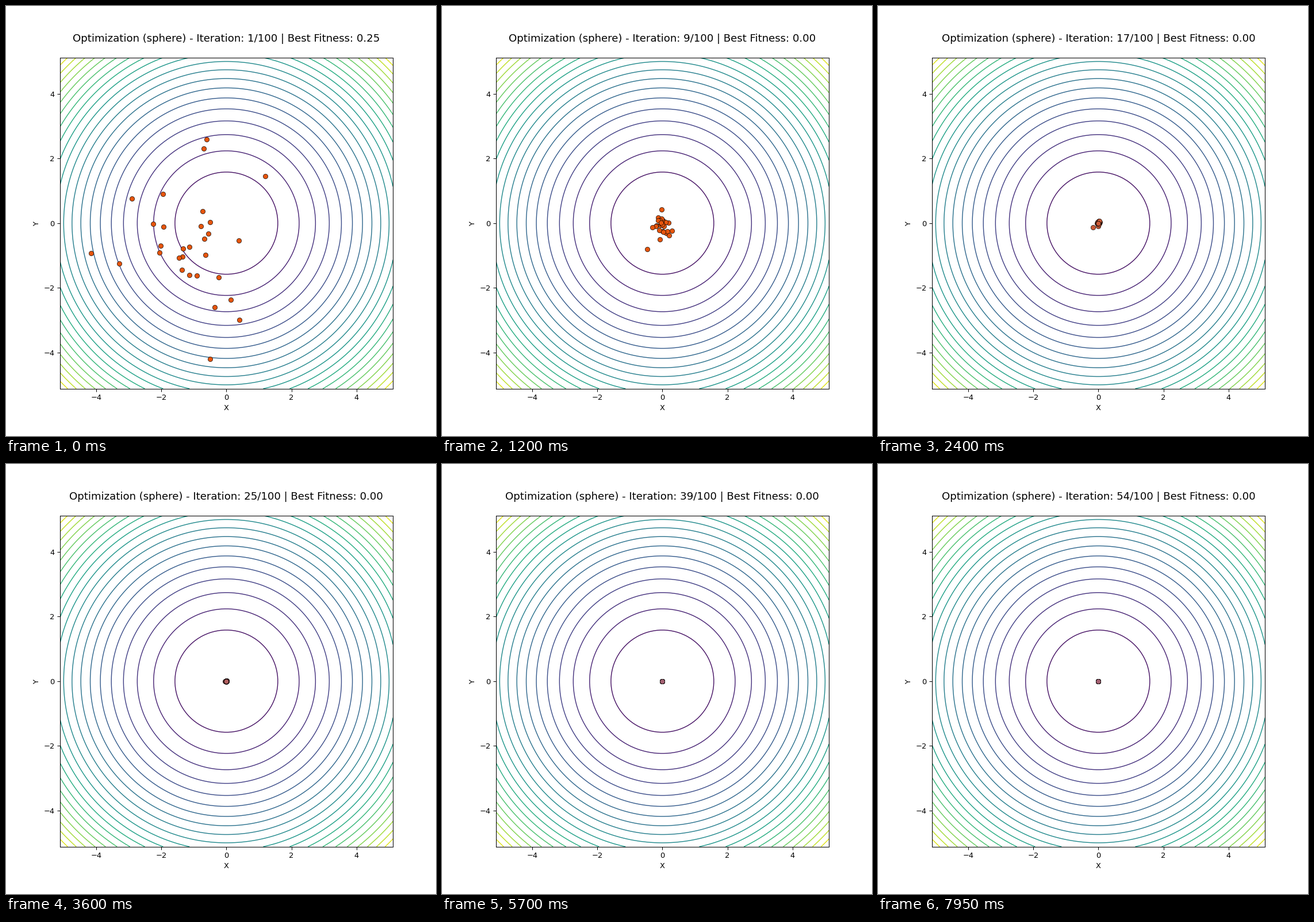
Write a matplotlib script that moves like this. It is 748 px wide and 748 px high and loops after 8 s.

```python
import numpy as np
import matplotlib.pyplot as plt
from matplotlib.animation import FuncAnimation

SIZE, INCHES = 748, 8
LIMIT = 5.12
TICK_MS, STEP_MS, LOOP_MS = 50, 150, 8000
COUNT = 30
ORANGE = np.array([230, 85, 13]) / 255
MAUVE = np.array([165, 98, 115]) / 255

# A few far scouts and the leader; the others form a loose cloud.
SCOUTS = [(-0.6, 2.6), (-0.7, 2.3), (1.2, 1.45), (-4.15, -0.93),
          (-2.9, 0.76), (-3.3, -1.25), (0.4, -3.0), (-0.5, -4.2)]
LEADER = (-0.5, 0.03)

rng = np.random.default_rng(4)
cloud = rng.normal((-0.9, -0.9), (0.7, 0.8), (COUNT - len(SCOUTS) - 1, 2))
distance = np.hypot(*cloud.T)[:, None]
cloud *= np.maximum(1, 0.65 / distance)
start = np.vstack([SCOUTS, cloud, [LEADER]]) @ (1, 1j)
rate = rng.uniform(0.18, 0.4, COUNT)
turn = rng.normal(0, 0.2, COUNT)


def swarm(iteration):
    """Each particle spirals into the minimum at its own speed."""
    z = start * np.exp((1j * turn - rate) * (iteration - 1))
    return np.column_stack([z.real, z.imag])


def face_color(iteration):
    t = np.clip((iteration - 9) / 20, 0, 1)
    return ORANGE + (MAUVE - ORANGE) * t


fig, ax = plt.subplots(figsize=(INCHES, INCHES), dpi=SIZE / INCHES)
axis = np.linspace(-LIMIT, LIMIT, 100)
X, Y = np.meshgrid(axis, axis)
ax.contour(X, Y, X ** 2 + Y ** 2, levels=np.arange(0, 52.6, 2.5),
           cmap="viridis", linewidths=1.1)
ax.set(xlim=(-LIMIT, LIMIT), ylim=(-LIMIT, LIMIT), xlabel="X", ylabel="Y")
title = ax.set_title("", fontsize=14, pad=21.5)
points = ax.scatter(*swarm(1).T, s=40, edgecolors="black", linewidths=0.5,
                    zorder=5)


def update(tick):
    iteration = tick * TICK_MS // STEP_MS + 1
    positions = swarm(iteration)
    best = (positions ** 2).sum(axis=1).min()
    points.set_offsets(positions)
    points.set_facecolor(face_color(iteration))
    title.set_text(f"Optimization (sphere) - Iteration: {iteration}/100 | "
                   f"Best Fitness: {best:.2f}")
    return points, title


animation = FuncAnimation(fig, update, frames=LOOP_MS // TICK_MS,
                          interval=TICK_MS, repeat=True, repeat_delay=0)
plt.show()
```
